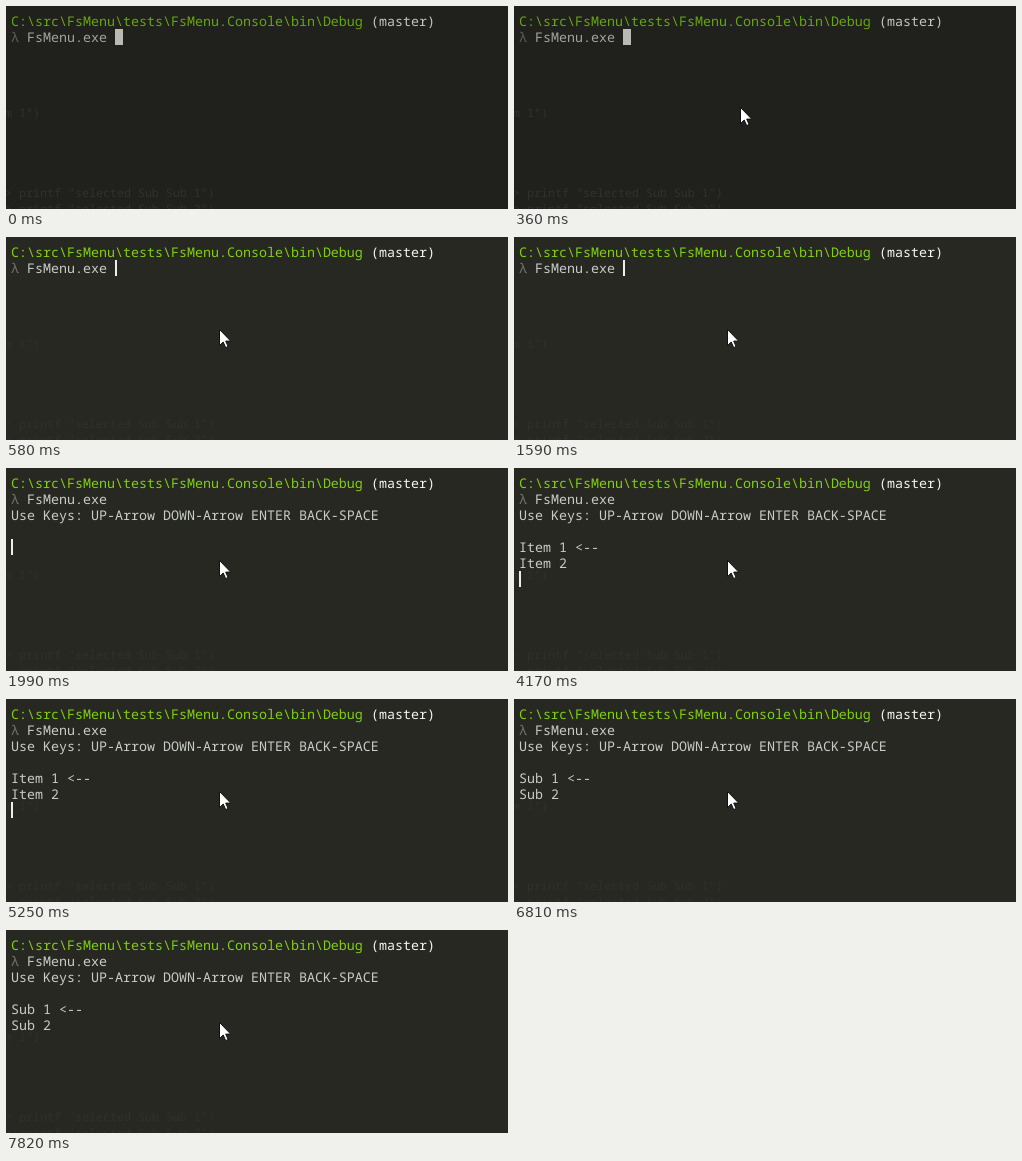
An HTML page for the animation above (8 s loop, 502 by 203 pixels).

```html
<!DOCTYPE html>
<html lang="en">
<head>
<meta charset="utf-8">
<title>Console menu</title>
<style>
  html, body { margin: 0; width: 100%; height: 100%; overflow: hidden; background: #272822; }
  svg {
    display: block; width: 502px; height: 203px;
    --bg: #272822; --path: #7fcf14; --branch: #f5f5ef; --prompt: #72736b;
    --text: #c8cbc8; --caret: #eeeee8; --ghost: #30312b;
  }
  svg.dim {
    --bg: #20211c; --path: #65a512; --branch: #c3c4c0; --prompt: #5c5d56;
    --text: #9fa3a2; --caret: #b9bab6; --ghost: #31322d;
  }
  text {
    font: 13.3333px "Noto Sans Mono", "DejaVu Sans Mono", monospace;
    font-variant-ligatures: none; text-rendering: geometricPrecision;
    white-space: pre; fill: var(--text);
  }
  .ghost text { font-size: 11.6667px; fill: var(--ghost); }
</style>
</head>
<body>
<svg id="stage" viewBox="0 0 502 203">
  <rect width="502" height="203" fill="var(--bg)"/>
  <g class="ghost">
    <text x="-1" y="111">m 1")</text>
    <text x="-1" y="191">&gt; printf "selected Sub Sub 1")</text>
    <text x="-1" y="207">&gt; printf "selected Sub Sub 2")</text>
  </g>
  <g id="lines"></g>
  <rect id="caret" height="16" fill="var(--caret)"/>
  <path id="pointer" d="M.5 .5V16.6L4.2 13 6.7 18.6 9.1 17.5 6.7 12.1H11.7Z"
        fill="#fff" stroke="#111" stroke-width="1"/>
</svg>
<script>
const LOOP = 8000, LEFT = 5, TOP = 7, CELL = 8, ROW = 16;
const FOCUS = 580, ENTER = 1820, HELP = 1990, MENU = 2080, SUBMENU = 6110;
const BLINKS = [1130, 1590, 2540, 3070, 3620, 4170, 4720, 5250, 5730, 6260, 6810, 7360, 7820];
const MOVES = [2920, 3470, 5730, 7280, 7440, 7670, 7820];
const POINTER = [[200, 309, 167], [280, 262, 128], [350, 226, 101], [430, 213, 92]];

const $ = id => document.getElementById(id);
const stage = $("stage"), caret = $("caret"), pointer = $("pointer");

function addText(col, row, content = "", color = "text") {
  const el = document.createElementNS("http://www.w3.org/2000/svg", "text");
  el.setAttribute("x", LEFT + col * CELL);
  el.setAttribute("y", TOP + row * ROW + 13);
  el.style.fill = `var(--${color})`;
  el.textContent = content;
  return $("lines").appendChild(el);
}

function setAttrs(el, attrs) {
  for (const key in attrs) el.setAttribute(key, attrs[key]);
}

addText(0, 0, "C:\\src\\FsMenu\\tests\\FsMenu.Console\\bin\\Debug", "path");
addText(45, 0, "(master)", "branch");
addText(0, 1, "λ", "prompt");
addText(2, 1, "FsMenu.exe");
const help = addText(0, 2, "Use Keys: UP-Arrow DOWN-Arrow ENTER BACK-SPACE");
const items = [addText(0, 4), addText(0, 5)];

const passed = (times, t) => times.filter(at => at <= t).length;

function caretCell(t) {
  if (t < ENTER) return [13, 1];
  if (t < HELP) return [0, 2];
  return [0, t < MENU ? 4 : 6];
}

// Opening the submenu puts the selection back on its first entry.
function selected(t) {
  const since = t < SUBMENU ? 0 : SUBMENU;
  return passed(MOVES.filter(at => at >= since), t) % 2;
}

function render(t) {
  stage.classList.toggle("dim", t < FOCUS);
  help.style.display = t < HELP ? "none" : "";

  const label = t < SUBMENU ? "Item" : "Sub";
  items.forEach((el, i) => {
    const mark = selected(t) === i ? " <--" : "";
    const line = t < MENU ? "" : `${label} ${i + 1}${mark}`;
    if (el.textContent !== line) el.textContent = line;
  });

  const [col, row] = caretCell(t);
  setAttrs(caret, {
    x: LEFT + col * CELL,
    y: TOP + row * ROW,
    width: t < FOCUS ? CELL : 2,
    visibility: passed(BLINKS, t) % 2 ? "hidden" : "visible"
  });

  const step = POINTER.filter(p => p[0] <= t).pop();
  pointer.setAttribute("visibility", step ? "visible" : "hidden");
  if (step) pointer.setAttribute("transform", `translate(${step[1]} ${step[2]})`);
}

const start = performance.now();
function tick() {
  render((performance.now() - start) % LOOP);
  requestAnimationFrame(tick);
}
tick();
</script>
</body>
</html>
```
